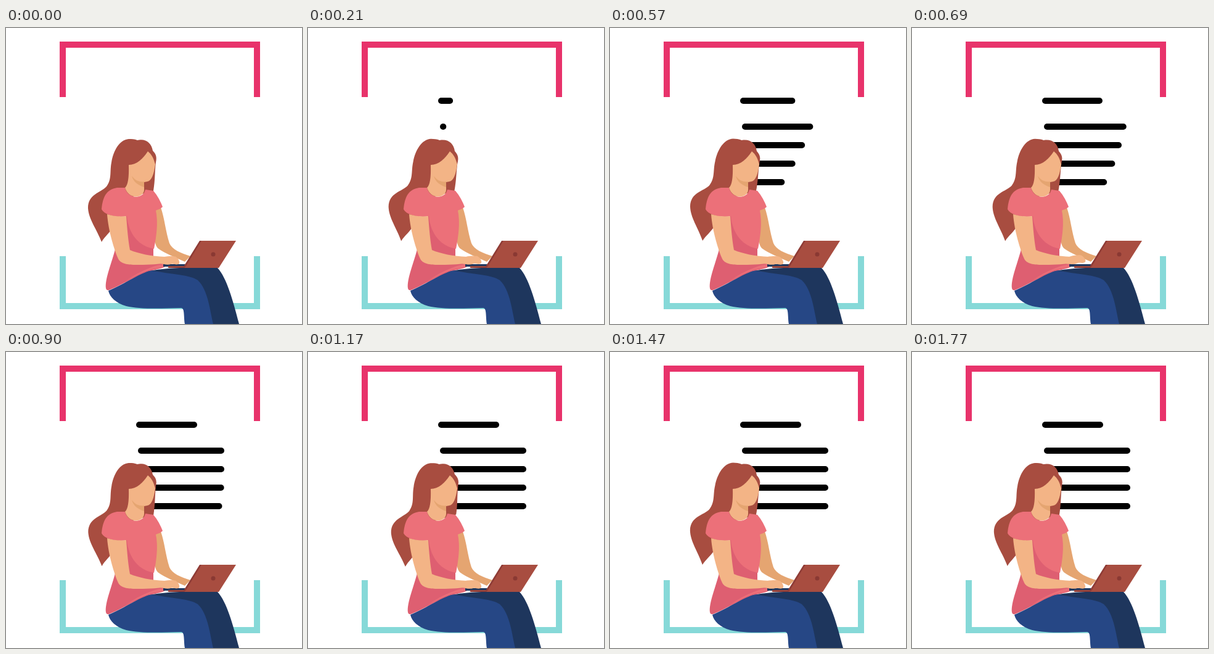
Animation, 480 px wide and 480 px high, one loop 1.8 s. Source, as an HTML page:

```html
<!DOCTYPE html>
<html lang="en">
<head>
<meta charset="utf-8">
<title>Woman typing</title>
<style>
html, body { margin: 0; height: 100%; overflow: hidden; background: #fff; }
svg { display: block; width: 100vw; height: 100vh; }
</style>
</head>
<body>
<svg viewBox="0 0 480 480">
  <g fill="none" stroke-width="10">
    <path stroke="#e8336b" d="M92 112V27H407V112"/>
    <path stroke="#86d9d8" d="M92 370V451H407V370"/>
  </g>
  <g id="lines" stroke="#000" stroke-width="10" stroke-linecap="round"></g>

  <path id="hair" fill="#a84d40" d="M213 182C208 180 204 180 199 180C184 181 174 199 171 218C168 233 172 245 163 257C154 267 133 269 133 292C134 310 147 326 155 347C160 338 168 333 175 320L200 275L239 264C242 246 241 235 243 218C245 209 243 204 238 199C236 187 227 179 213 182Z"/>

  <!-- far arm -->
  <path fill="#e5a571" d="M240 292C246 320 236 345 246 357C258 366 275 372 290 379L299 370C283 365 269 359 265 349C259 331 257 308 251 291Z"/>
  <!-- legs -->
  <path fill="#1e365d" d="M228 395C260 388 300 388 343 389C358 405 368 442 378 480H330L300 410Z"/>
  <path fill="#264785" d="M166 426C195 414 218 396 235 393C270 400 298 400 311 409C328 425 331 460 336 480H290C288 468 290 454 284 454C250 455 215 456 195 451C178 446 168 436 166 426Z"/>

  <!-- shirt -->
  <path fill="#de5f71" d="M178 355C172 380 160 407 162 422Q163 426 167 425C190 416 215 399 232 394C246 391 260 389 260 384L239 371V348L196 300Z"/>
  <path fill="#ec7079" d="M194 410C212 401 224 394 238 391C249 389 260 388 260 383C243 383 220 393 194 410Z"/>
  <path fill="#ec7079" d="M193 259C197 277 222 279 226 262L239 264C246 272 251 282 254 290C250 294 247 294 243 296C247 315 244 338 240 358C216 354 199 335 196 305C182 308 160 304 155 294C157 273 163 262 180 259Z"/>

  <!-- head and neck -->
  <path fill="#f3b486" d="M199 222C212 222 222 212 230 200C236 205 239 210 242 221C240 237 236 248 229 249L224 250V263C223 276 199 279 193 259Q200 253 199 222Z"/>
  <path fill="#e5a571" d="M204 240C210 248 217 250 224 249V258C213 255 206 248 204 240Z"/>

  <!-- laptop -->
  <path fill="#1e365d" d="M255 383H292V387H255Z"/>
  <path fill="#a84d40" d="M263 386H289L315 345H373L345 389H263Z"/>
  <path fill="#8f3c36" d="M314 345H317L292 386L289 389H263V387H288Z"/>
  <circle cx="336" cy="367" r="3.5" fill="#8a3933"/>

  <!-- near arm -->
  <path fill="#f3b486" d="M164 302C166 330 176 360 181 372C185 384 200 384 215 384C235 384 248 383 260 381L258 371C235 370 215 366 201 360C198 345 196 320 195 305Q180 307 164 302Z"/>
  <path id="hand" fill="#f3b486" d="M250 373C259 369 270 370 275 371C280 374 283 381 280 383C275 385 272 382 268 383C262 385 256 383 250 382Z"/>
</svg>
<script>
const LOOP = 1800;
const $ = id => document.getElementById(id);

// Each line: left end, right end, y; they start 60 ms apart.
const lines = [[216, 305, 118], ...[160, 190, 220, 250].map(y => [219, 349, y])].map(([x1, x2, y], i) => {
  const el = document.createElementNS("http://www.w3.org/2000/svg", "path");
  $("lines").append(el);
  return { el, x1, x2, y, start: 150 + 60 * i };
});

// Hair swing: time and rotation in degrees
const swing = [[-150, 1.5], [0, 0], [210, 1.5], [450, 2], [690, 1.5], [1060, -1.4],
  [1170, -1.1], [1470, 2], [1640, 1.5], [1770, 0.1], [1860, -0.3]];

function swingAt(t) {
  const i = swing.findIndex(k => k[0] > t) - 1;
  const [a, b] = [swing[i], swing[i + 1]];
  const slope = j => {
    const [p, q] = [swing[Math.max(j - 1, 0)], swing[Math.min(j + 1, swing.length - 1)]];
    return (q[1] - p[1]) / (q[0] - p[0]);
  };
  const d = b[0] - a[0], u = (t - a[0]) / d, v = 1 - u;
  return v * v * (1 + 2 * u) * a[1] + u * u * (3 - 2 * u) * b[1]
    + d * u * v * (v * slope(i) - u * slope(i + 1));
}

function draw(t) {
  for (const { el, x1, x2, y, start } of lines) {
    const p = Math.min(Math.max((t - start) / 600, 0), 1);
    const x = x1 + (x2 - x1) * Math.sin(p * Math.PI / 2);
    el.setAttribute("d", t < start ? "" : `M${x1} ${y}H${Math.max(x, x1 + 0.01)}`);
  }
  $("hair").setAttribute("transform", `rotate(${swingAt(t)} 212 200)`);
  const tap = (1 + Math.cos((t - 120) / 300 * 2 * Math.PI)) / 2;
  $("hand").setAttribute("transform", `rotate(${-8 * tap} 254 377)`);
}

const origin = performance.now();
function frame() {
  draw((performance.now() - origin) % LOOP);
  requestAnimationFrame(frame);
}
frame();
</script>
</body>
</html>
```
